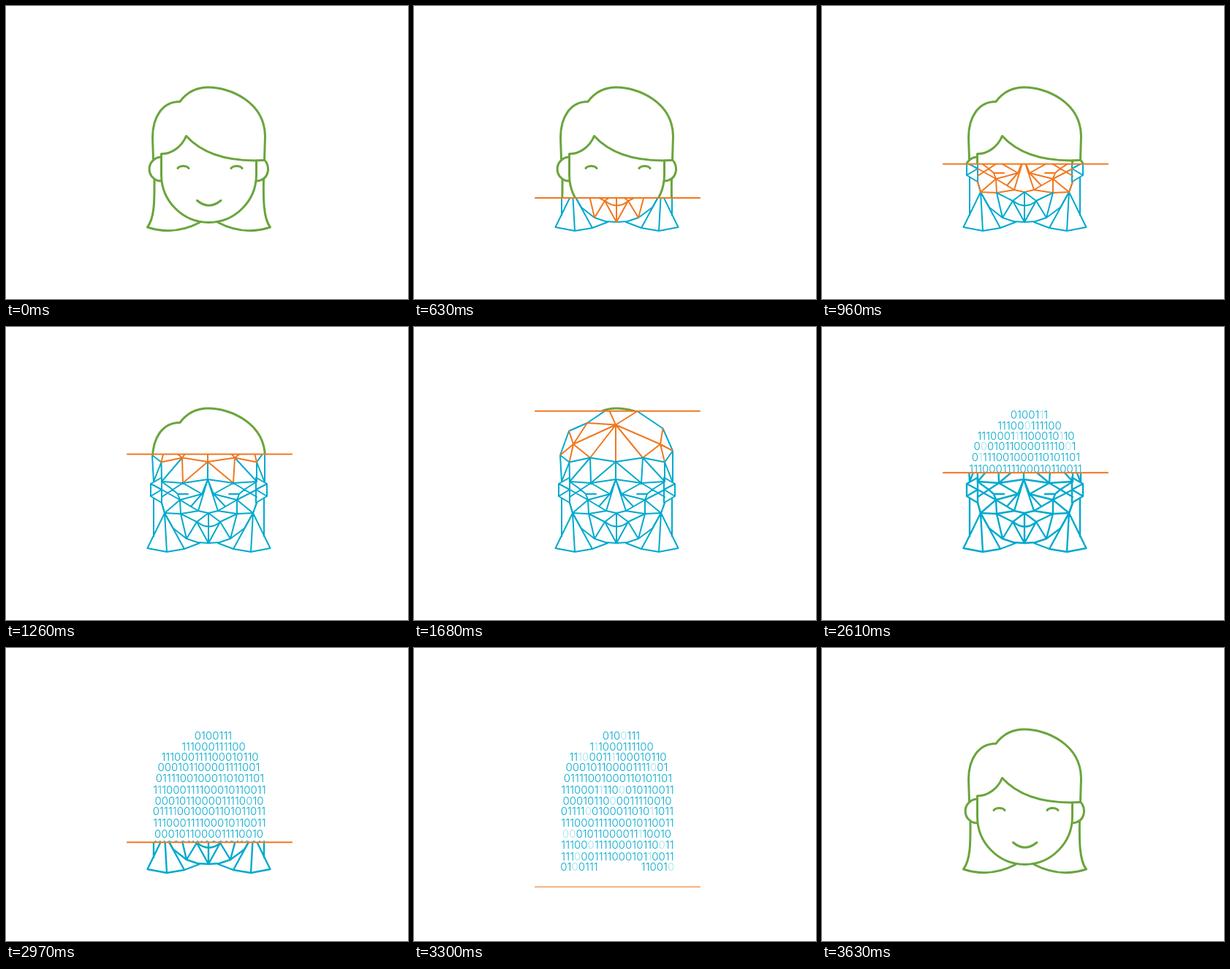
An HTML page without scripts for the animation above (4630 ms loop, 550 by 400 pixels).

```html
<!DOCTYPE html>
<html lang="en">
<head>
<meta charset="utf-8">
<title>Face scan</title>
<style>
:root { --loop: 4630ms; --green: #6aa53c; --blue: #00a9ce; --orange: #f07820; }
html, body { margin: 0; width: 100%; height: 100%; overflow: hidden; background: #fff; }
svg {
  position: absolute; left: 0; top: 0; width: 550px; height: 400px;
  fill: none; stroke-linecap: round; stroke-linejoin: round;
}
.face, .mesh, .bits, .beam { animation: var(--loop) linear infinite; }
.face { stroke: var(--green); stroke-width: 3; animation-name: face; }
.mesh { stroke: var(--blue); animation-name: mesh; }
.bits { fill: var(--blue); font: 300 15px Inter, sans-serif; text-anchor: middle; animation-name: bits; }
.beam { stroke: var(--orange); stroke-width: 2.2; animation-name: beam; }

/* 3.24% scan starts, 42.117% turns at the top, 73.218% ends */
@keyframes face {
  0%, 3.24% { clip-path: inset(0 0 70.6px 0); opacity: 1; }
  42.117% { clip-path: inset(0 0 323px 0); opacity: 1; }
  42.13%, 72.57% { clip-path: inset(0 0 0px 0); opacity: 0; }
  78.4%, 100% { clip-path: inset(0 0 0px 0); opacity: 1; }
}
@keyframes mesh {
  0%, 3.24% { clip-path: inset(329.4px 0 0 0); stroke-width: 2; }
  42.117% { clip-path: inset(77px 0 0 0); stroke-width: 2; }
  49%, 100% { stroke-width: 2.4; }
  73.218%, 100% { clip-path: inset(342.5px 0 0 0); }
}
@keyframes bits {
  0%, 42.117% { clip-path: inset(0 0 323px 0); }
  72.57% { opacity: 1; }
  73.218% { clip-path: inset(0 0 57.5px 0); }
  78.4%, 100% { clip-path: inset(0 0 57.5px 0); opacity: 0; }
}
@keyframes beam {
  0%, 3.23% { transform: translateY(329.4px); opacity: 0; }
  3.24% { transform: translateY(329.4px); opacity: .3; }
  6.48% { opacity: 1; }
  42.117% { transform: translateY(77px); }
  69.98% { opacity: 1; }
  73.218%, 100% { transform: translateY(342.5px); opacity: 0; }
}

/* fresh edges glow orange, then settle to blue */
.hot { animation: cool var(--loop) linear infinite both; }
.chin { animation-delay: 720ms; }
.eyes { animation-delay: 1080ms; }
.brow { animation-delay: 1380ms; }
.crown { animation-delay: 1740ms; }
@keyframes cool {
  0% { stroke: var(--orange); }
  2.6%, 58% { stroke: var(--blue); }
  60%, 100% { stroke: var(--orange); }
}

/* five flickers per loop */
tspan { animation: dim calc(var(--loop) / 5) linear infinite; }
.p { animation-delay: -168ms; }
.q { animation-delay: -404ms; }
.r { animation-delay: -636ms; }
.s { animation-delay: -866ms; }
@keyframes dim {
  0%, 100% { fill-opacity: .35; }
  15%, 85% { fill-opacity: 1; }
}
</style>
</head>
<body>

<svg class="face" viewBox="0 0 550 400">
  <path d="M201.5 209L200.5 180C200.5 150 215 130.5 238 130.5C248 117 262 111 277 111C305 111 354 130 354.5 178L353.5 210"/>
  <path d="M212.5 202C228 202 241 191 246.5 177.5C270 203 308 213 353.5 210.5"/>
  <path d="M212.5 202V230a65 65.5 0 0 0 130 0V211"/>
  <path d="M212.5 206.3a16.4 16.4 0 0 0 0 32.8M354 210.5C361.5 218 361 238 342.5 239"/>
  <path d="M203 236C203 262 204 288 193.5 302C218 310 243 307 265 295.5"/>
  <path d="M352.5 236C352 262 352 290 361.5 302C337 310 312 307 290 295.5"/>
  <path d="M235 221.5C238 217.5 247 217.5 250 221.5M308 221.5C311 217.5 320 217.5 323 221.5"/>
  <path d="M261.5 265.5Q277.5 279 294 265.5"/>
</svg>

<svg class="mesh" viewBox="0 0 550 400">
  <!-- hair and ear, mirrored -->
  <g id="side">
    <path d="M202 234V286M217 254L193.5 302L220 307L244 303L265 295M220 307L217 254L244 303"/>
    <path d="M213 205.5L198 214V231L213 240ZM198 214L213 222L198 231"/>
  </g>
  <use href="#side" transform="translate(555 0) scale(-1 1)"/>
  <!-- outline -->
  <path d="M202 211L200 175L212 142L237 131L266 111.5L305.5 115L340.5 138.5L354 169V211"/>
  <path d="M200 175L212.5 184.5L202 211M212.5 184.5L213 211L241 178.5M354 169L343 184.5L353.5 211M343 184.5V211L313 178.5M276 184V208"/>
  <path d="M213 240L217 254L229 275L247 289L262 294L277 295L292 294L307 289L326 275L338 254L343 240"/>
  <path class="hot crown" d="M266 111.5L276 133.5L305.5 115M237 131L276 133.5L218 160L212 142M237 131L218 160L200 175M212.5 184.5L218 160L241 178.5L276 133.5V184M276 133.5L313 178.5L337 160L276 133.5M340.5 138.5L337 160L354 169M337 160L343 184.5"/>
  <path class="hot brow" d="M212.5 184.5L241 178.5L276 184L313 178.5L343 184.5M241 178.5L242 213L276 184L311 213L313 178.5"/>
  <g class="hot eyes">
    <path d="M213 211L242 213L276 208L311 213L343 211"/>
    <path d="M213 211L228 222L235 228H249M242 213L213 232M213 222L238 236L268 228L242 213M235 228L238 236"/>
    <path d="M268 228L276 208L263 251L238 236L217 254M268 228L253 245M213 240L217 254M238 236L239 255"/>
    <path d="M343 211L326 222L319 228H305M311 213L343 232M343 222L316 236L284 228L311 213M319 228L316 236"/>
    <path d="M284 228L276 208L290 251L316 236L338 254M284 228L300 245M343 240L338 254M316 236V255"/>
    <path d="M217 254L239 255L263 251L277 254L290 251L316 255L338 254"/>
  </g>
  <g class="hot chin">
    <path d="M261 266L239 255L247 289L261 266L277 295L293 266L307 289L316 255L293 266L277 254L261 266M277 254V295"/>
    <path d="M261.5 266Q277.5 279 293.5 266"/>
  </g>
</svg>

<svg class="bits" viewBox="0 0 550 400">
  <text x="283.5" y="125">010<tspan class="q">0</tspan>1<tspan class="p">1</tspan>1</text>
  <text x="284" y="139.5">1<tspan class="q">1</tspan>100<tspan class="p">0</tspan>11<tspan class="r">1</tspan>100</text>
  <text x="279" y="154">11<tspan class="q">10</tspan>001<tspan class="p">1</tspan><tspan class="q">1</tspan>10<tspan class="s">0</tspan>010<tspan class="p">1</tspan>10</text>
  <text x="277.5" y="168">0<tspan class="p">0</tspan>0101<tspan class="r">1</tspan>00001<tspan class="s">1</tspan>11<tspan class="q">0</tspan><tspan class="p">0</tspan>1</text>
  <text x="279" y="183">0<tspan class="p">1</tspan>1110<tspan class="s">0</tspan>10001<tspan class="r">1</tspan>0101101</text>
  <text x="278.5" y="199">1<tspan class="r">1</tspan>10001<tspan class="q">1</tspan>110<tspan class="q">0</tspan>01<tspan class="s">0</tspan>110011</text>
  <text x="278" y="214">000<tspan class="s">1</tspan>0110<tspan class="q">0</tspan>001<tspan class="p">1</tspan>110<tspan class="r">0</tspan>10</text>
  <text x="278" y="228">0111<tspan class="r">1</tspan><tspan class="q">0</tspan>010<tspan class="p">0</tspan>01101<tspan class="s">0</tspan><tspan class="q">1</tspan>1011</text>
  <text x="278.5" y="244">111<tspan class="s">0</tspan>0011<tspan class="p">1</tspan>100010<tspan class="r">1</tspan>10011</text>
  <text x="277.5" y="259"><tspan class="q">0</tspan><tspan class="q">0</tspan>0101<tspan class="p">1</tspan>0000<tspan class="s">1</tspan>1<tspan class="q">1</tspan>10010</text>
  <text x="278.5" y="274">11100<tspan class="q">0</tspan>111<tspan class="r">1</tspan>0001011<tspan class="s">0</tspan><tspan class="q">0</tspan>11</text>
  <text x="278.5" y="290">111<tspan class="q">0</tspan>001<tspan class="s">1</tspan>1100010<tspan class="r">1</tspan><tspan class="q">1</tspan>0011</text>
  <text x="226" y="304">01<tspan class="q">0</tspan>01<tspan class="r">1</tspan>1</text>
  <text x="333.5" y="304">11<tspan class="s">0</tspan>01<tspan class="q">0</tspan></text>
</svg>

<svg viewBox="0 0 550 400"><path class="beam" d="M166 0H391"/></svg>

</body>
</html>
```
